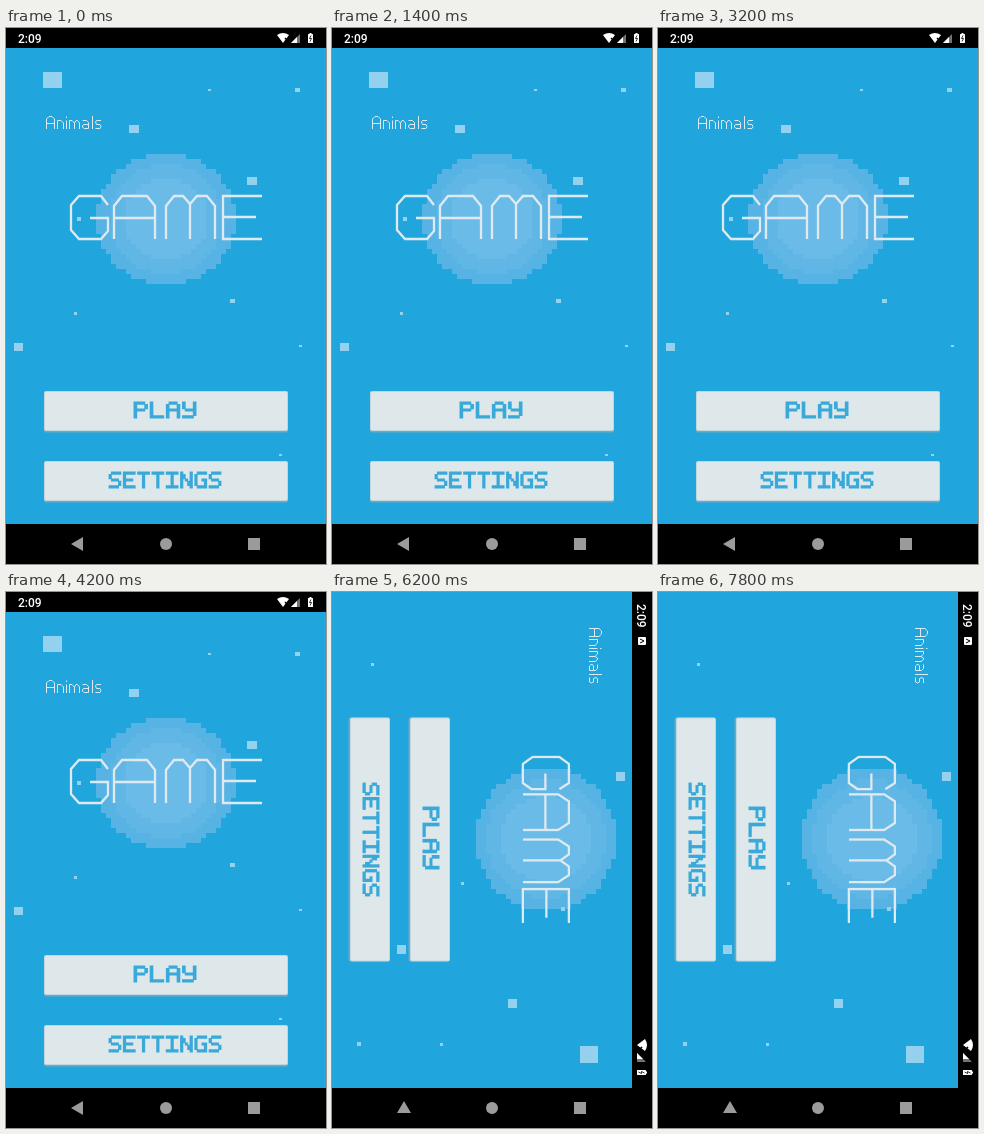
Write an HTML page that moves like this. It is 320 by 536 pixels and loops after 8000 ms.

```html
<!DOCTYPE html>
<html lang="en">
<head>
<meta charset="utf-8">
<title>Game menu</title>
<style>
html, body { margin: 0; width: 100%; height: 100%; overflow: hidden; background: #000; }
svg { display: block; width: 100%; height: 100%; }
.clock { font: 500 12px Roboto, sans-serif; fill: #fff; }
.line { fill: none; stroke: #dfeaf0; }
.line path { vector-effect: non-scaling-stroke; }
.label { fill: none; stroke: #38a9d9; stroke-width: 1.35; stroke-linecap: square; }
.stars { fill: #93d1ee; }
.nav { fill: #9b9b9b; }
#landscape { transform-origin: 160px 268px; }
</style>
</head>
<body>
<svg id="stage" viewBox="0 0 320 536"></svg>
<script>
const LOOP = 8000;
const SKY = '#20a5dc';

// Block letters as strokes on a 5 x 7 cell grid; corners are notched.
const GLYPHS = {
  P: 'M0 6V0H3M4 1V2M3 3H0',
  L: 'M0 0V6H4',
  A: 'M0 6V1M1 0H3M4 1V6M0 3H4',
  Y: 'M0 0V2M1 3H4M4 0V5M3 6H0',
  S: 'M4 0H1M0 1V2M1 3H3M4 4V5M3 6H0',
  E: 'M4 0H0V6H4M0 3H3',
  T: 'M0 0H4M2 0V6',
  I: 'M0 0H4M2 0V6M0 6H4',
  N: 'M0 6V0M1 1V2M2 3V3.01M3 4V5M4 0V6',
  G: 'M4 0H1M0 1V5M1 6H4V3H3'
};

const TITLE = 'M102 177L95 168H73L65 177V202L73 211H95L102 203V190H84' +
  'M108 211V178L116 168H141L149 178V211M108 190H149' +
  'M160 211V178L168 168H177L184 176V211M184 176L191 168H201L209 178V211' +
  'M256 168H217V211H256M217 189H250';

const SUBTITLE = 'M40.5 101V91L43 88.5H46L48.5 91V101M40.5 95.5H48.5' +
  'M51.5 101V92.5H55L57.5 95V101M60.5 92.5V101M60.5 88.5V90' +
  'M63.5 101V92.5H66L68.5 95V101M68.5 95L70 92.5H71.5L73.5 95V101' +
  'M76.5 92.5H80.5L82.5 94.5V100.5H78L76.5 99V97.5L78 96.5H82.5' +
  'M86.5 88V101M95 92.5H90.5L89.5 94L90.5 96.5H94L95 98.5L94 100.5H89.5';

const rect = (x, y, w, h, attrs = '') =>
  `<rect x="${x}" y="${y}" width="${w}" height="${h}" ${attrs}/>`;

function blockText(word, x, y, w, h) {
  const sx = w / (word.length * 6 - 1), sy = h / 7;
  const letters = [...word].map((c, i) =>
    `<path transform="translate(${i * 6 + .5} .5)" d="${GLYPHS[c]}"/>`).join('');
  return `<g class="label" role="img" aria-label="${word}" transform="translate(${x} ${y}) scale(${sx} ${sy})">${letters}</g>`;
}

function button(word, x, y, textX, textW) {
  return rect(x, y + 1, 244, 40.5, 'rx="2" fill="#70a9c3"') +
    rect(x, y, 244, 40, 'rx="2" fill="#c3d5dd"') +
    rect(x + 1, y + 1, 242, 38, 'rx="1" fill="#dee7ea"') +
    blockText(word, textX, y + 11, textW, 16);
}

// Stepped ellipse built from horizontal rows.
function blockEllipse(cx, cy, rx, ry, fill) {
  const cell = 5;
  let d = '';
  for (let y = -ry; y < ry; y += cell) {
    const mid = Math.min(.98, Math.abs(y + cell / 2) / ry);
    const half = Math.max(cell, Math.round(rx * Math.sqrt(1 - mid * mid) / cell) * cell);
    d += `M${cx - half} ${cy + y}h${2 * half}v${cell}h${-2 * half}z`;
  }
  return `<path d="${d}" fill="${fill}" shape-rendering="crispEdges"/>`;
}

function halo(cx, cy, rx, ry) {
  return [[1, '#56b3e3'], [.82, '#60b7e6'], [.6, '#6bbbe9']]
    .map(([k, fill]) => blockEllipse(cx, cy, rx * k, Math.round(ry * k / 5) * 5, fill)).join('');
}

function stars(list) {
  return `<g class="stars">${list.map(s => rect(...s)).join('')}</g>`;
}

function statusBar(shift) {
  return `<text class="clock" x="12" y="15">2:09</text>
    <g transform="translate(${shift} 0)" fill="#fff">
      <path d="M271 7Q277 3 283 7L277 15Z"/>
      <path d="M279 10l4 4m0-4l-4 4" stroke="#000" stroke-width="1.5"/>
      <path d="M294 6V15H285Z" opacity=".45"/><path d="M291 9V15H285Z"/>
      ${rect(302, 6, 5, 9, 'rx=".5"')}${rect(303.5, 5, 2, 1)}
      <path d="M305 7.5l-1.5 3h2l-1.5 3" fill="none" stroke="#000" stroke-width=".8"/>
    </g>`;
}

function lettering(sub, title) {
  return `<g class="line">
    <g role="img" aria-label="Animals" transform="${sub}"><path d="${SUBTITLE}" stroke-width="1"/></g>
    <g role="img" aria-label="GAME" transform="${title}"><path d="${TITLE}" stroke-width="2.3"/></g>
  </g>`;
}

const portrait = rect(0, 20, 320, 476, `fill="${SKY}"`) +
  halo(160, 191, 70, 65) +
  stars([[37, 44, 19, 16], [123, 97, 10, 8], [241, 149, 10, 8], [8, 315, 9, 8],
    [224, 271, 5, 4], [289, 60, 5, 4], [202, 61, 3, 2], [71, 189, 4, 4],
    [68, 284, 3, 3], [293, 317, 3, 2], [273, 426, 3, 2]]) +
  lettering('', '') +
  button('PLAY', 38, 363, 128, 62) +
  button('SETTINGS', 38, 433, 103, 112) +
  statusBar(0) +
  `<g class="nav"><path d="M65 516L77 509V523Z"/><circle cx="160" cy="516" r="6"/>${rect(242, 510, 12, 12)}</g>`;

const landscape = rect(0, 20, 496, 300, `fill="${SKY}"`) +
  halo(247, 106, 72, 72) +
  stars([[454, 54, 17, 18], [407, 135, 9, 9], [180, 27, 9, 9], [353, 246, 9, 9],
    [315, 87, 4, 4], [71, 278, 3, 3], [290, 188, 3, 3], [450, 291, 4, 4], [451, 209, 3, 3]]) +
  lettering('translate(-4 -38)', 'translate(108.5 -96.7) scale(.869 1.07)') +
  button('PLAY', 125.5, 202, 215, 62) +
  button('SETTINGS', 125.5, 262, 191, 113) +
  statusBar(176) +
  `<g id="notice">${rect(45, 6, 8, 8, 'rx="1" fill="#fff"')}<path d="M47 12l2-4 2 4" fill="none" stroke="#000"/></g>` +
  `<g class="nav"><path d="M509 248L521 241V255Z"/><circle cx="516" cy="160" r="6"/>${rect(510, 66, 12, 12)}</g>`;

document.getElementById('stage').innerHTML = `
  <rect width="320" height="536"/>
  <g id="portrait">${portrait}</g>
  <g id="landscape"><g transform="translate(320 0) rotate(90)">${landscape}</g></g>`;

// Each row holds its values until the next row's time.
function play(id, steps) {
  const frames = steps.map(([time, style]) => ({ ...style, offset: time / LOOP, easing: 'step-end' }));
  frames.push({ ...steps[steps.length - 1][1], offset: 1 });
  document.getElementById(id).animate(frames, { duration: LOOP, iterations: Infinity })
    .startTime = 0;
}

const turn = (deg, opacity = 1) => ({ transform: `rotate(${deg}deg)`, opacity });
play('portrait', [[0, { opacity: 1 }], [4400, { opacity: 0 }]]);
play('landscape', [[0, turn(-90, 0)], [4400, turn(-27)], [4600, turn(-.25)], [4800, turn(0)]]);
play('notice', [[0, { opacity: 0 }], [5000, { opacity: 1 }]]);
</script>
</body>
</html>
```
